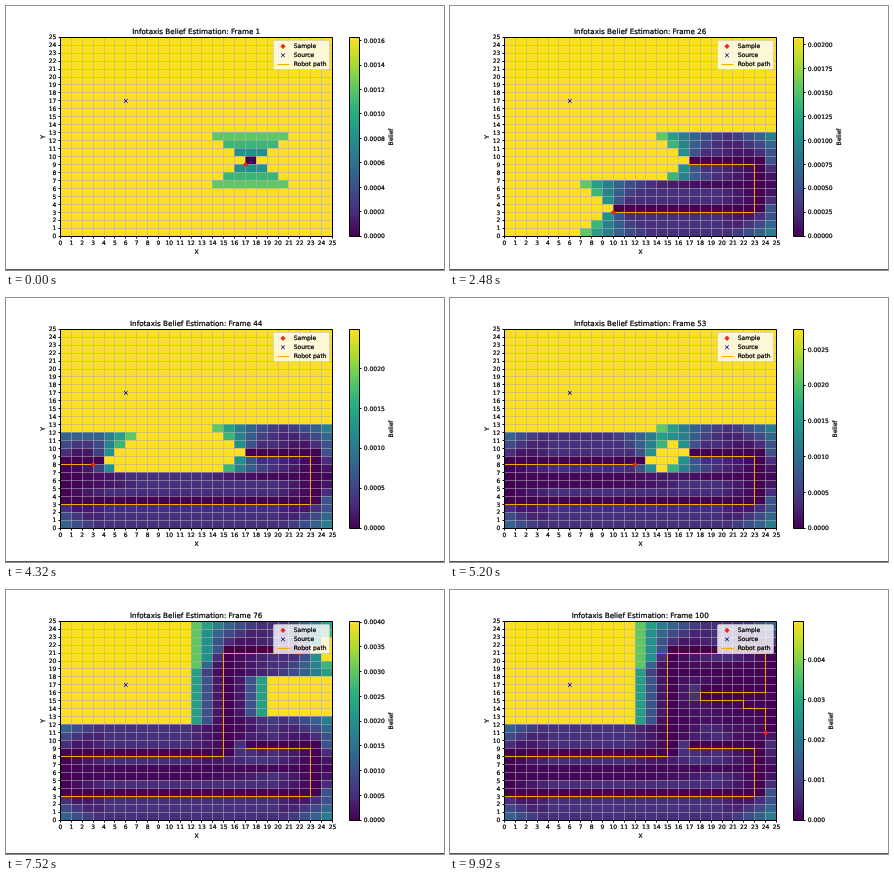
Recreate the animation shown at these times as an HTML page with a canvas. Size 438 by 264 pixels, loop 10 s.

```html
<!DOCTYPE html>
<html lang="en">
<head>
<meta charset="utf-8">
<title>Belief estimation</title>
<style>
  html, body { margin: 0; width: 438px; height: 264px; overflow: hidden; background: #fff; }
  canvas { display: block; }
</style>
</head>
<body>
<canvas id="stage" width="438" height="264"></canvas>
<script>
const ctx = document.getElementById('stage').getContext('2d');
const SIZE = 25, LEFT = 54.5, RIGHT = 326.5, TOP = 31.2, BOTTOM = 230.2;
const BAR_LEFT = 343.5, BAR_RIGHT = 353.7;
const FONT = '"DejaVu Sans", sans-serif';
const GRID = 'rgba(176,176,176,0.55)', PATH = '#ffa500', NAVY = '#00008b';
const px = x => LEFT + x * (RIGHT - LEFT) / SIZE;
const py = y => BOTTOM - y * (BOTTOM - TOP) / SIZE;
const snap = v => Math.floor(v) + 0.5;

const viridis = [
  [68, 1, 84], [71, 45, 123], [59, 82, 139], [44, 114, 142], [33, 145, 140],
  [40, 174, 128], [94, 201, 98], [173, 220, 48], [253, 223, 34]
];
function color(v) {
  const s = Math.min(Math.max(v, 0), 1) * (viridis.length - 1);
  const i = Math.min(Math.floor(s), viridis.length - 2);
  const mix = viridis[i].map((c, k) => Math.round(c + (viridis[i + 1][k] - c) * (s - i)));
  return `rgb(${mix})`;
}

// The robot moves one cell per step between these corners.
const corners = [
  [17, 9], [23, 9], [23, 3], [0, 3], [0, 8], [15, 8], [15, 21], [24, 21],
  [24, 16], [18, 16], [18, 15], [22, 15], [22, 14], [24, 14], [24, 11]
];
const path = [corners[0]];
for (const [cx, cy] of corners.slice(1)) {
  let [x, y] = path[path.length - 1];
  while (x !== cx || y !== cy) {
    x += Math.sign(cx - x);
    y += Math.sign(cy - y);
    path.push([x, y]);
  }
}

// Each empty sample lowers belief in the cones above and below the robot.
function beliefAt(step) {
  const grid = Array.from({ length: SIZE }, () => Array(SIZE).fill(1));
  for (const [rx, ry] of path.slice(0, step + 1)) {
    for (let dy = -3; dy <= 3; dy++) {
      const reach = Math.abs(dy), row = grid[ry + dy];
      if (!row) continue;
      for (let x = Math.max(0, rx - reach); x <= Math.min(SIZE - 1, rx + reach); x++) {
        row[x] *= reach / (reach + 1);
      }
    }
  }
  return grid;
}

function line(points, stroke, width = 1) {
  ctx.beginPath();
  points.forEach(([x, y]) => ctx.lineTo(x, y));
  ctx.strokeStyle = stroke;
  ctx.lineWidth = width;
  ctx.stroke();
}

// Lines on whole pixels stay sharp.
const sharpLine = (points, stroke) => line(points.map(p => p.map(snap)), stroke);

function text(str, x, y, align = 'center', size = 6) {
  ctx.font = `${size}px ${FONT}`;
  ctx.textAlign = align;
  ctx.fillStyle = ctx.strokeStyle = '#000';
  ctx.lineWidth = 0.22;
  ctx.fillText(str, x, y);
  ctx.strokeText(str, x, y);
}

function sideText(str, x, y) {
  ctx.save();
  ctx.translate(x, y);
  ctx.rotate(-Math.PI / 2);
  text(str, 0, 2.2);
  ctx.restore();
}

function diamond(x, y) {
  const r = 2.6;
  ctx.beginPath();
  ctx.moveTo(x, y - r);
  ctx.lineTo(x + r, y);
  ctx.lineTo(x, y + r);
  ctx.lineTo(x - r, y);
  ctx.fillStyle = '#f5231a';
  ctx.fill();
}

function cross(x, y) {
  const r = 1.8;
  line([[x - r, y - r], [x + r, y + r]], NAVY);
  line([[x - r, y + r], [x + r, y - r]], NAVY);
}

function frame(left, right) {
  sharpLine([[left, TOP], [right, TOP], [right, BOTTOM], [left, BOTTOM], [left, TOP]], '#000');
}

function drawCells(grid) {
  grid.forEach((row, y) => row.forEach((v, x) => {
    const x0 = Math.floor(px(x)), x1 = Math.floor(px(x + 1));
    const y0 = Math.floor(py(y + 1)), y1 = Math.floor(py(y));
    ctx.fillStyle = color(v);
    ctx.fillRect(x0, y0, x1 - x0, y1 - y0);
  }));
}

function drawAxes() {
  for (let i = 0; i <= SIZE; i++) {
    const x = px(i), y = py(i);
    sharpLine([[x, TOP], [x, BOTTOM]], GRID);
    sharpLine([[LEFT, y], [RIGHT, y]], GRID);
    sharpLine([[x, BOTTOM], [x, BOTTOM + 2]], '#000');
    sharpLine([[LEFT, y], [LEFT - 2, y]], '#000');
    text(i, x, 239.2);
    text(i, LEFT - 4.2, y + 2.2, 'right');
  }
  text('X', 190.5, 248);
  sideText('Y', 37, 131);
}

function drawLegend() {
  ctx.beginPath();
  ctx.roundRect(267.5, 34.5, 56, 29, 1.2);
  ctx.fillStyle = 'rgba(255,255,255,0.8)';
  ctx.fill();
  ctx.strokeStyle = '#ccc';
  ctx.lineWidth = 0.6;
  ctx.stroke();
  diamond(277, 40.3);
  cross(277, 49.3);
  sharpLine([[271, 58], [283, 58]], PATH);
  ['Sample', 'Source', 'Robot path'].forEach((s, i) => text(s, 287.7, 42.4 + i * 8.9, 'left'));
}

function drawColorbar(max) {
  const height = BOTTOM - TOP;
  for (let y = 0; y < height; y++) {
    ctx.fillStyle = color(1 - y / height);
    ctx.fillRect(Math.floor(BAR_LEFT), Math.floor(TOP) + y, Math.floor(BAR_RIGHT) - Math.floor(BAR_LEFT), 1);
  }
  frame(BAR_LEFT, BAR_RIGHT);
  const [step, digits] = [[0.0002, 4], [0.00025, 5], [0.0005, 4], [0.001, 3]]
    .find(([s]) => s >= max / 9);
  for (let i = 0; i * step <= max; i++) {
    const y = BOTTOM - height * i * step / max;
    sharpLine([[BAR_RIGHT, y], [BAR_RIGHT + 2, y]], '#000');
    text((i * step).toFixed(digits), BAR_RIGHT + 4.1, y + 2.2, 'left');
  }
  sideText('Belief', 369.6 + digits * 3.82, 131);
}

function draw(step) {
  const grid = beliefAt(step);
  const total = grid.flat().reduce((a, b) => a + b);
  const peak = Math.max(...grid.flat());
  ctx.fillStyle = '#fff';
  ctx.fillRect(0, 0, 438, 264);
  drawCells(grid);
  drawAxes();
  const trail = path.slice(0, step + 1).map(([x, y]) => [px(x), py(y)]);
  sharpLine(trail, PATH);
  cross(px(6), py(17));
  diamond(...trail[step]);
  frame(LEFT, RIGHT);
  drawLegend();
  drawColorbar(peak / total);
  text(`Infotaxis Belief Estimation: Frame ${step + 1}`, 190.2, 27.7, 'center', 7.2);
  ctx.fillStyle = '#555';
  ctx.fillRect(0, 263, 438, 1);
}

// Steps are 100 ms apart, shown on an 80 ms clock.
const start = performance.now();
let shown = -1;
function tick() {
  const t = Math.max(0, performance.now() - start) % 10000;
  const step = Math.min(99, Math.round(Math.floor(t / 80) * 0.8));
  if (step !== shown) draw(shown = step);
  requestAnimationFrame(tick);
}
tick();
</script>
</body>
</html>
```
